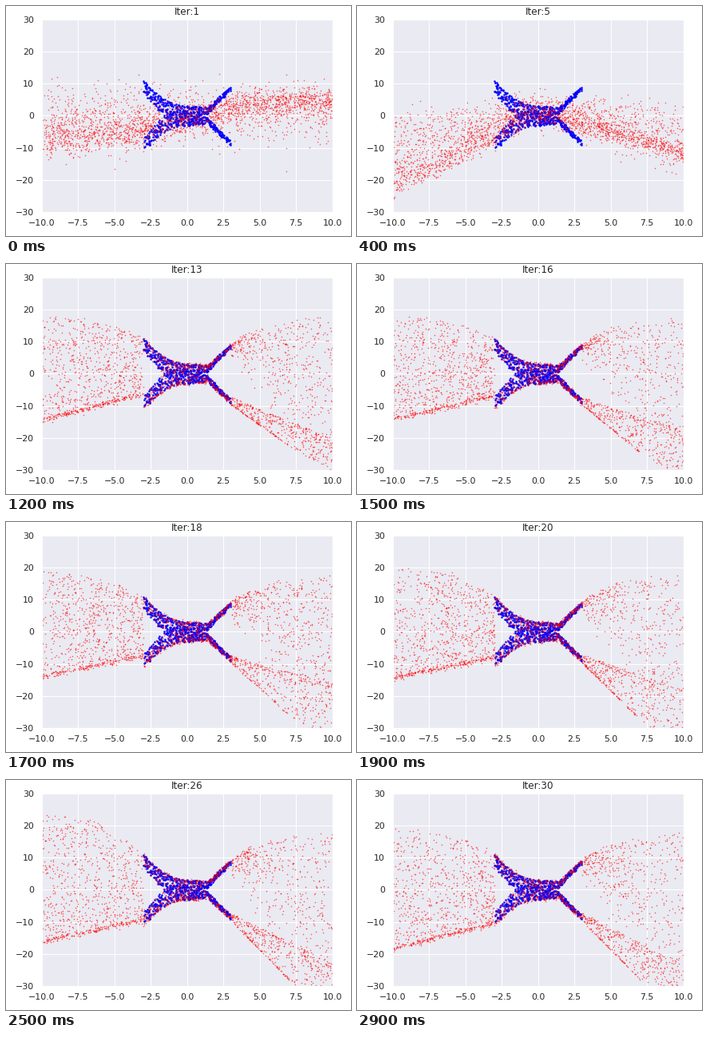
Recreate the animation shown at these times as a matplotlib script. Size 432 px wide and 288 px high, loop 3000 ms.

```python
import numpy as np
import matplotlib.pyplot as plt
from matplotlib.animation import FuncAnimation

WIDTH, HEIGHT, DPI = 432, 288, 72
STEPS = 30
N_MODEL = 2500
N_DATA = 750
TENT, FIT = 9, 13   # steps at which the cloud reaches its second and third shape

plt.rcParams.update({
    "font.family": "DejaVu Sans", "font.size": 12,
    "axes.titlesize": 12, "xtick.labelsize": 11, "ytick.labelsize": 11,
    "text.color": ".15", "xtick.color": ".15", "ytick.color": ".15",
    "axes.facecolor": "#EAEAF2", "axes.edgecolor": "white",
    "axes.linewidth": 1.25, "axes.axisbelow": True,
    "axes.grid": True, "grid.color": "white", "grid.linewidth": 1,
    "xtick.bottom": False, "ytick.left": False,
    "xtick.major.size": 6, "ytick.major.size": 6,
})


def lerp(a, b, t):
    return a + (b - a) * t


def inner_edge(x):
    return np.maximum(0, np.maximum(-4.8 * (x + 1.6), 4.5 * (x - 1.25)))


def outer_edge(x):
    right = np.maximum(3.1 - .3 * x, 4.25 * (x - .8))
    return np.where(x < 0, 3.1 + .9 * x ** 2, right)


def data_points():
    rng = np.random.default_rng(7)
    x = rng.uniform(-3, 3, N_DATA)
    sign = rng.choice([-1, 1], N_DATA)
    return x, sign * lerp(inner_edge(x), outer_edge(x), rng.random(N_DATA))


def start_cloud(x, u, pick, noise):
    """A rising band over a broad flat scatter."""
    band = 6 * np.tanh(x / 5) - .8 + (2.6 - .05 * x) * noise
    return np.where(pick < .68, band, .5 + 4.6 * noise)


def tent_cloud(x, u, pick, noise):
    """Points piled on the lower edge of an upside-down V."""
    left = x < 0
    low = np.where(left, -4.2, -3.1) * np.maximum(np.abs(x) - .5, 0)
    height = 9 + np.where(left, 3.4, 2.4) * np.abs(x)
    return low + height * u ** np.where(left, 2.3, 4) + .15 * noise


def core(x, u, pick, noise):
    """Bow-tie shape of the data, densest along its edges."""
    sign = np.where(pick < .5, -1, 1)
    edge = lerp(inner_edge(x), outer_edge(x), 1 - u ** 1.7)
    return sign * edge + .3 * noise


def left_wing(step, x, u, pick, noise):
    d = np.maximum(-3 - x, 0)
    rise = 8 + 9 * np.exp(-((step - 24) / 4) ** 2)
    top = 11 + rise * (1 - np.exp(-d / 3))
    slope = .9 + .3 * ((step - 22) / 9) ** 2
    ridge = -6 - .25 * (step - FIT) - slope * d
    fill = lerp(ridge - 1, top, u ** 1.2)
    return np.where(pick < .17, ridge + .35 * noise, fill + .4 * noise)


def right_wing(step, x, u, pick, noise):
    d = np.maximum(x - 3, 0)
    near = np.exp(-d / 1.2)
    top = 9.3 + 9 * (1 - np.exp(-d / 2.5))
    low = -9.5 - (3.2 + 1.4 * min((step - FIT) / 8, 1)) * d
    ridge = -7.5 - min(1.25 + .12 * abs(step - 18), 2.3) * d
    below = lerp(ridge, low, u ** 1.6)
    above = lerp(ridge, top, u ** (1 / (1 + 8 * near)))
    y = np.where(pick < .5, below, above)
    on_edge = (pick < .12) & (d < 4)
    return np.where(on_edge, low + .1 * noise, y + .25 * noise)


def fitted_cloud(step, x, *draws):
    return np.select([x < -3, x > 3],
                     [left_wing(step, x, *draws), right_wing(step, x, *draws)],
                     core(x, *draws))


def model_points(step):
    rng = np.random.default_rng(100 + step)
    x = rng.uniform(-10, 10, N_MODEL)
    draws = x, rng.random(N_MODEL), rng.random(N_MODEL), rng.normal(size=N_MODEL)
    if step < TENT:
        t = (step - 1) / (TENT - 1)
        y = lerp(start_cloud(*draws), tent_cloud(*draws), t)
    else:
        t = min((step - TENT) / (FIT - TENT), 1)
        y = lerp(tent_cloud(*draws), fitted_cloud(max(step, FIT), *draws), t)
    return np.column_stack([x, y])


fig, ax = plt.subplots(figsize=(WIDTH / DPI, HEIGHT / DPI), dpi=DPI)
fig.subplots_adjust(left=44.6 / WIDTH, right=408.8 / WIDTH,
                    bottom=1 - 257.8 / HEIGHT, top=1 - 17 / HEIGHT)
ax.set(xlim=(-10, 10), ylim=(-30, 30),
       xticks=np.arange(-10, 10.1, 2.5), yticks=range(-30, 31, 10))

ax.scatter(*data_points(), s=1, c="blue", linewidths=1.5, zorder=1)
model = ax.scatter([], [], s=2.5, c="red", alpha=.6, linewidths=0, zorder=1.1)
title = ax.set_title("Iter:1")


def update(i):
    model.set_offsets(model_points(i + 1))
    title.set_text(f"Iter:{i + 1}")
    return model, title


anim = FuncAnimation(fig, update, frames=STEPS, interval=100,
                     repeat=True, repeat_delay=0, blit=False)
plt.show()
```
